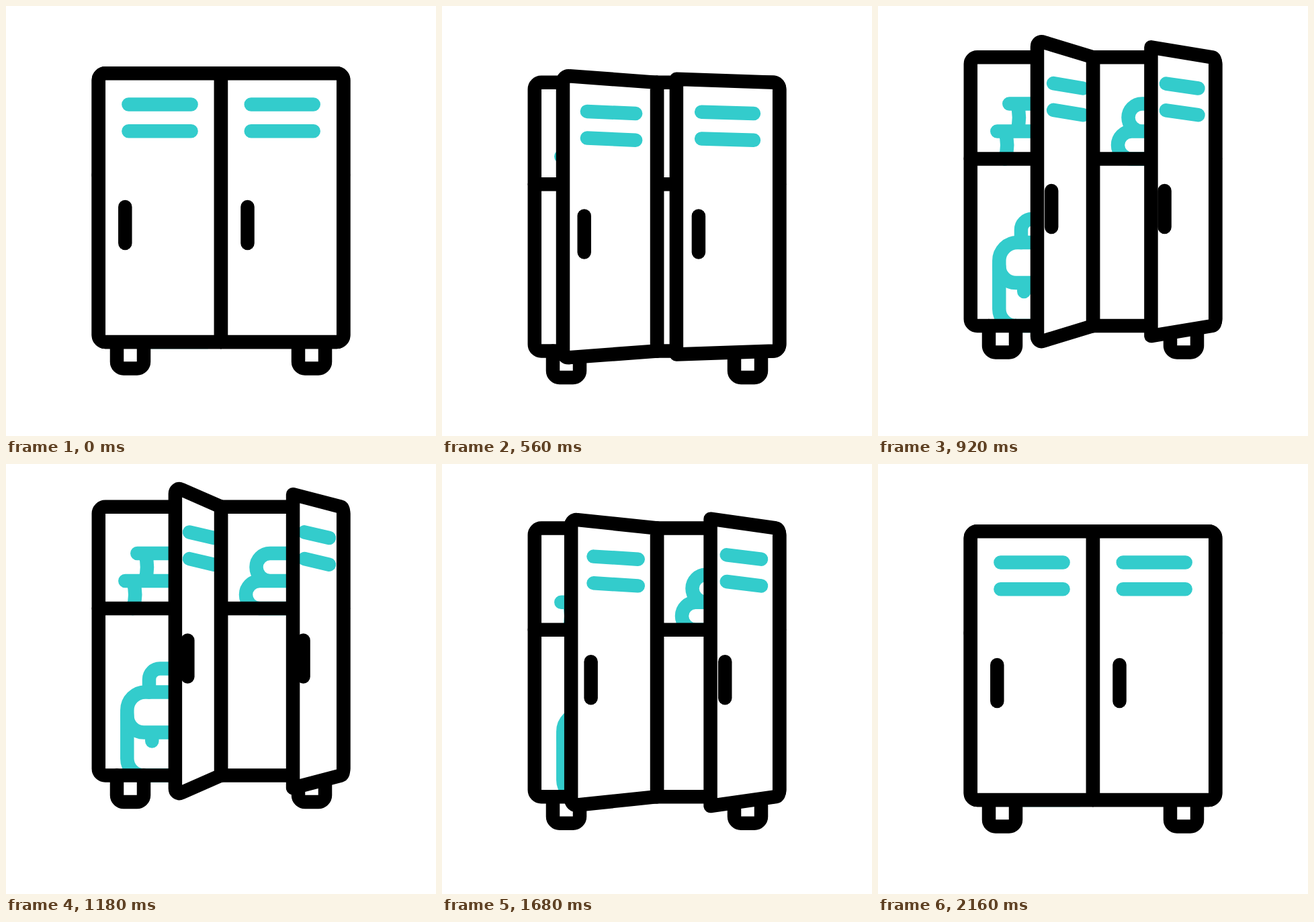
An HTML page for the animation above (2480 ms loop, 640 by 640 pixels).

```html
<!DOCTYPE html>
<html lang="en">
<head>
<meta charset="utf-8">
<title>Lockers</title>
<style>
  html, body { margin: 0; width: 100%; height: 100%; overflow: hidden; background: #fff; }
  svg { display: block; width: 100vw; height: 100vh; }
  .line { fill: none; stroke: #000; stroke-width: 20.5; stroke-linecap: round; stroke-linejoin: round; }
  .teal { stroke: #3cc; }
  .white { fill: #fff; }
</style>
</head>
<body>
<svg viewBox="0 0 640 640">
  <g id="locker">
    <g class="line teal">
      <!-- stacked bowls -->
      <path d="M195.3 169.5H300M207 169.5Q213 190 207 210.5M177.3 210.5H300M189 210.5Q195.500 231 189 251.500"/>
      <!-- folded towels -->
      <path d="M470 169.5H393a20.5 20.5 0 0 0 0 41H470M393 210.5H377.5a20.5 20.5 0 0 0 0 41H470"/>
      <!-- backpack -->
      <path d="M213 376V357a16 16 0 0 1 16 -16H300"/>
      <path d="M300 500H205.300a25 25 0 0 1 -25 -25V403a27 27 0 0 1 27 -27H300"/>
      <path d="M180.3 411a25 25 0 0 0 25 25H300M217.300 436V449"/>
    </g>
    <g class="line">
      <path d="M165 500V529.500a10 10 0 0 0 10 10H195a10 10 0 0 0 10 -10V500"/>
      <path d="M435 500V529.500a10 10 0 0 0 10 10H465a10 10 0 0 0 10 -10V500"/>
      <rect x="137.8" y="100.3" width="364.4" height="399.7" rx="10"/>
      <path d="M320 100.3V500M137.8 251.600H502"/>
    </g>
    <g id="left"></g>
    <g id="right"></g>
  </g>
</svg>
<script>
const LOOP = 2480, STEP = 20, MIRROR = 600.3;
const locker = document.getElementById('locker');
const mix = (a, b, p) => a + (b - a) * p;

function bezier(x1, x2) {
  // control heights are 0 and 1, so the curve starts and ends at rest
  return u => {
    let lo = 0, hi = 1;
    for (let i = 0; i < 24; i++) {
      const s = (lo + hi) / 2, r = 1 - s;
      if (3 * x1 * s * r * r + 3 * x2 * s * s * r + s * s * s < u) lo = s; else hi = s;
    }
    return lo * lo * (3 - 2 * lo);
  };
}

const soft = bezier(.33, .67);

// each key: time, value, easing towards it
const tracks = {
  lift: [[200, 0], [400, 25.5, soft], [1500, -41, bezier(.18, .3)], [1840, 25.5, soft], [2160, 0, soft]],
  left: [[400, 0], [1500, 1, bezier(.106, .121)], [1840, 0, soft]],
  right: [[400, 0], [1500, 1, bezier(.088, .33)], [1540, 1, soft], [1920, 0, soft]]
};

function valueAt(keys, t) {
  if (t <= keys[0][0]) return keys[0][1];
  for (let i = 1; i < keys.length; i++) {
    const [t0, v0] = keys[i - 1], [t1, v1, ease] = keys[i];
    if (t < t1) return mix(v0, v1, ease((t - t0) / (t1 - t0)));
  }
  return keys[keys.length - 1][1];
}

// corner points: x, y shut, then x, y open
const doors = {
  left: {
    edge: [[320, 100.3, 320, 100.3], [148, 100.3, 266, 73.3], [142.4, 100.3, 261, 70.8],
           [137.8, 104.8, 257, 74.5], [137.8, 110.5, 257, 79.5]],
    vent: [182.4, 277, 275.6, 311], rise: 8.9, handle: [177.3, 274.5]
  },
  right: {
    edge: [[320, 100.3, 435, 80.3], [492, 100.3, 499, 100.3], [497.6, 100.3, 501.5, 101.2],
           [502.2, 104.8, 502.2, 104.8], [502.2, 110.5, 502.2, 110.5]],
    vent: [364.7, 450, 457.7, 482.7], rise: 9.2, handle: [359.5, 448.7]
  }
};

function addPath(parent, cls) {
  const el = document.createElementNS('http://www.w3.org/2000/svg', 'path');
  el.setAttribute('class', cls);
  parent.appendChild(el);
  return el;
}

for (const id in doors) {
  const g = document.getElementById(id);
  doors[id].parts = ['white', 'line teal', 'line', 'line'].map(cls => addPath(g, cls));
}

function drawDoor(door, p) {
  const top = door.edge.map(([x, y, ox, oy]) => [mix(x, ox, p), mix(y, oy, p)]);
  const [a, b, c, d, e] = top;
  const [A, B, C, D, E] = top.map(([x, y]) => [x, MIRROR - y]);
  const outline = `M${a}L${b}C${c} ${d} ${e}L${E}C${D} ${C} ${B}L${A}Z`;
  const [x0, o0, x1, o1] = door.vent;
  const vents = [146.5, 186.2].map(y =>
    `M${mix(x0, o0, p)} ${y - door.rise * p}L${mix(x1, o1, p)} ${y}`).join('');
  const handle = `M${mix(...door.handle, p)} 299V353`;
  [outline, vents, outline, handle].forEach((path, i) => door.parts[i].setAttribute('d', path));
}

function render(ms) {
  const t = Math.floor((ms % LOOP) / STEP) * STEP;
  locker.setAttribute('transform', `translate(0 ${valueAt(tracks.lift, t)})`);
  for (const id in doors) drawDoor(doors[id], valueAt(tracks[id], t));
}

const start = performance.now();
function tick() {
  render(performance.now() - start);
  requestAnimationFrame(tick);
}
tick();
</script>
</body>
</html>
```
